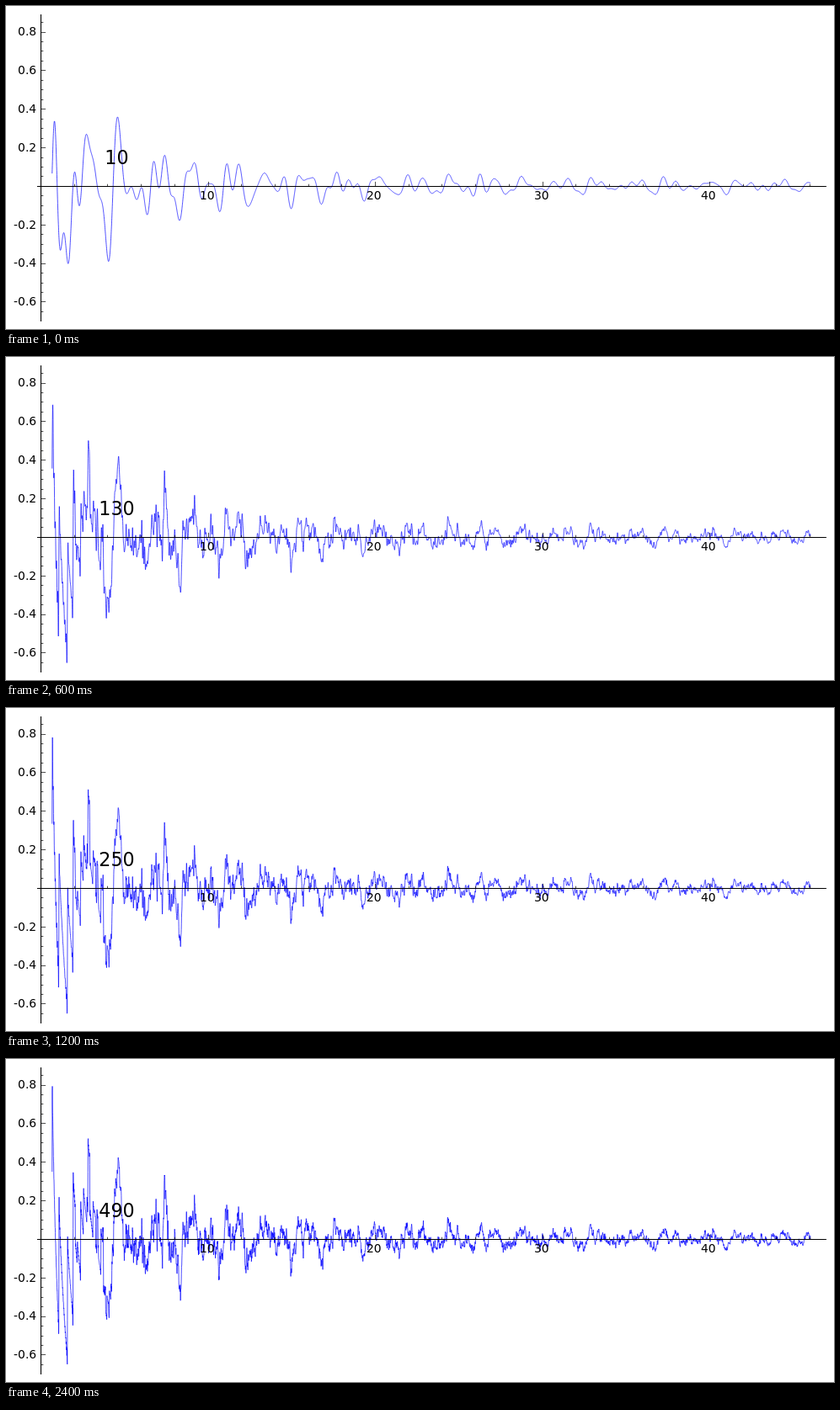
Recreate the animation shown at these times as an HTML page. Size 983 px wide and 384 px high, loop 2600 ms.

```html
<!DOCTYPE html>
<html lang="en">
<head>
<meta charset="utf-8">
<title>Oscillating sum</title>
<style>
  html, body { margin: 0; width: 100%; height: 100%; overflow: hidden; background: #fff; }
  svg { display: block; width: 983px; height: 384px; }
  text { font: 13.89px "DejaVu Sans", sans-serif; fill: #000; }
  #count { font-size: 22.22px; text-anchor: middle; }
  .right { text-anchor: end; }
  #curve { fill: none; stroke: #00f; stroke-width: .69; stroke-linejoin: round; }
  #axes { stroke: #000; stroke-width: 1.1; }
  #ticks { stroke: #000; stroke-width: .69; }
</style>
</head>
<body>
<svg viewBox="0 0 983 384">
  <path id="curve"/>
  <path id="ticks"/>
  <path id="axes" d="M37 214.5H974M41.5 10V375"/>
  <g id="labels"></g>
  <text id="count" x="131.5" y="188"></text>
</svg>
<script>
const STEP = 200, STEPS = 13, FIRST = 10, ADD = 40;
const COND = 389, TERMS = 4000;
const $ = id => document.getElementById(id);
const px = u => 41 + 19.85 * u;
const py = v => 213.9 - 229.2 * v;

// Dirichlet coefficients for the curve y^2 + y = x^3 + x^2 - 2x
function coefficients(max) {
  const a = new Float64Array(max + 1), factor = new Int32Array(max + 1);
  a[1] = 1;
  for (let n = 2; n <= max; n++) {
    if (!factor[n]) {
      for (let m = n; m <= max; m += n) factor[m] = factor[m] || n;
      a[n] = n === 2 ? -2 : tracePrime(n);
      continue;
    }
    const p = factor[n], m = n / p;
    a[n] = a[p] * a[m];
    if (m % p === 0 && p !== COND) a[n] -= p * a[m / p];
  }
  return a;
}

function tracePrime(p) {
  const chi = new Int8Array(p).fill(-1);
  chi[0] = 0;
  for (let x = 1; x <= p / 2; x++) chi[x * x % p] = 1;
  let sum = 0;
  for (let x = 0; x < p; x++) {
    const f = (((4 * x + 4) * x - 8) * x + 1) % p;
    sum += chi[f < 0 ? f + p : f];
  }
  return -sum;
}

// Heights of the zeros on the critical line, from a smoothed integral
// of the completed L-function along Re s = 2
function findZeros(count) {
  const h = 0.05, reach = 240, stride = 8, top = 285;
  const t0 = -reach * h, size = Math.round((top - t0) / h);
  const re = new Float64Array(size), im = new Float64Array(size);
  const a = coefficients(TERMS);

  for (let n = 1; n <= TERMS; n++) {
    if (!a[n]) continue;
    const ln = Math.log(n), amp = a[n] / (n * n);
    const c = Math.cos(h * ln), s = -Math.sin(h * ln);
    let x = amp * Math.cos(t0 * ln), y = -amp * Math.sin(t0 * ln);
    for (let k = 0; k < size; k++) {
      re[k] += x;
      im[k] += y;
      const next = x * c - y * s;
      y = x * s + y * c;
      x = next;
    }
  }

  const logQ = Math.log(Math.sqrt(COND) / (2 * Math.PI));
  for (let k = 0; k < size; k++) {
    const t = t0 + k * h, g = logGamma(t);
    const r = Math.exp(g[0] + Math.PI * t / 2), phase = g[1] + t * logQ;
    const c = r * Math.cos(phase), s = r * Math.sin(phase);
    const x = re[k];
    re[k] = x * c - im[k] * s;
    im[k] = x * s + im[k] * c;
  }

  const taps = [];
  for (let j = -reach; j <= reach; j += stride) {
    const y = j * h, g = Math.exp(-y * y / 8) / (1 + y * y);
    const c = Math.cos(y / 4), s = Math.sin(y / 4);
    taps.push([j, g * (c + s * y), g * (s - c * y)]);
  }
  const z = new Float64Array(size - 2 * reach);
  for (let k = 0; k < z.length; k++) {
    for (const [j, x, y] of taps) {
      const i = k + reach + j;
      z[k] += re[i] * y + im[i] * x;
    }
  }

  const at = t => {
    const k = Math.floor(t / h), f = t / h - k;
    return -f * (f - 1) * (f - 2) / 6 * z[k - 1]
      + (f + 1) * (f - 1) * (f - 2) / 2 * z[k]
      - (f + 1) * f * (f - 2) / 2 * z[k + 1]
      + (f + 1) * f * (f - 1) / 6 * z[k + 2];
  };
  const zeros = [], fine = 0.01;
  let last = at(1);
  for (let i = 1; zeros.length < count; i++) {
    const t = 1 + i * fine;
    if (t > 272) break;
    const now = at(t);
    if (last * now < 0) zeros.push(t - fine * now / (now - last));
    last = now;
  }
  return zeros;
}

// log gamma(2 + it) up to a constant, as [real, imaginary]
function logGamma(t) {
  const x = 8, q = x * x + t * t, r = Math.log(q) / 2, phi = Math.atan2(t, x);
  let a = (x - 0.5) * r - t * phi + x / (12 * q);
  let b = t * r + (x - 0.5) * phi - t - t / (12 * q);
  for (let k = 2; k < x; k++) {
    a -= Math.log(k * k + t * t) / 2;
    b -= Math.atan2(t, k);
  }
  return [a, b];
}

// Partial sums (2/u) * sum sin(gamma u)/gamma; the double zero at 0 is counted but adds nothing
function buildCurves() {
  const POINTS = 6400, lo = Math.log(2), hi = 20 * Math.log(10);
  const zeros = findZeros(FIRST - 2 + ADD * (STEPS - 1));
  const sum = new Float64Array(POINTS + 1), du = (hi - lo) / POINTS;
  const paths = [];
  let used = 0;
  for (let s = 0; s < STEPS; s++) {
    const end = Math.min(FIRST - 2 + ADD * s, zeros.length);
    for (; used < end; used++) {
      const g = zeros[used];
      for (let i = 0; i <= POINTS; i++) sum[i] += Math.sin(g * (lo + i * du)) / g;
    }
    const pts = [];
    for (let i = 0; i <= POINTS; i++) {
      const u = lo + i * du;
      pts.push(px(u).toFixed(2) + " " + py(2 * sum[i] / u).toFixed(2));
    }
    paths.push("M" + pts.join("L"));
  }
  return paths;
}

function label(text, x, y, cls) {
  const el = document.createElementNS("http://www.w3.org/2000/svg", "text");
  el.setAttribute("x", x);
  el.setAttribute("y", y);
  el.setAttribute("class", cls);
  el.textContent = text;
  $("labels").append(el);
}

function drawScale() {
  const snap = v => Math.round(v) + 0.5;
  let d = "";
  for (let i = -13; i <= 17; i++) {
    if (i) d += `M41.5 ${snap(py(i / 20))}h${i % 4 ? 2.8 : 5.6}`;
    if (i && i % 4 === 0) label((i / 20).toFixed(1), 36.2, Math.round(py(i / 20) + 4.9), "right");
  }
  for (let u = 2; u <= 46; u += 2) {
    d += `M${snap(px(u))} 214.5v${u % 10 ? -2.8 : -5.6}`;
    if (u % 10 === 0) label(u, Math.round(px(u) - 9.8), 230, "left");
  }
  $("ticks").setAttribute("d", d);
}

drawScale();
const curves = buildCurves();
let shown = -1;

function show(step) {
  if (step === shown) return;
  shown = step;
  $("curve").setAttribute("d", curves[step]);
  $("count").textContent = FIRST + ADD * step;
}

show(0);
const start = performance.now();
function tick() {
  show(Math.floor((performance.now() - start) / STEP) % STEPS);
  requestAnimationFrame(tick);
}
requestAnimationFrame(tick);
</script>
</body>
</html>
```
